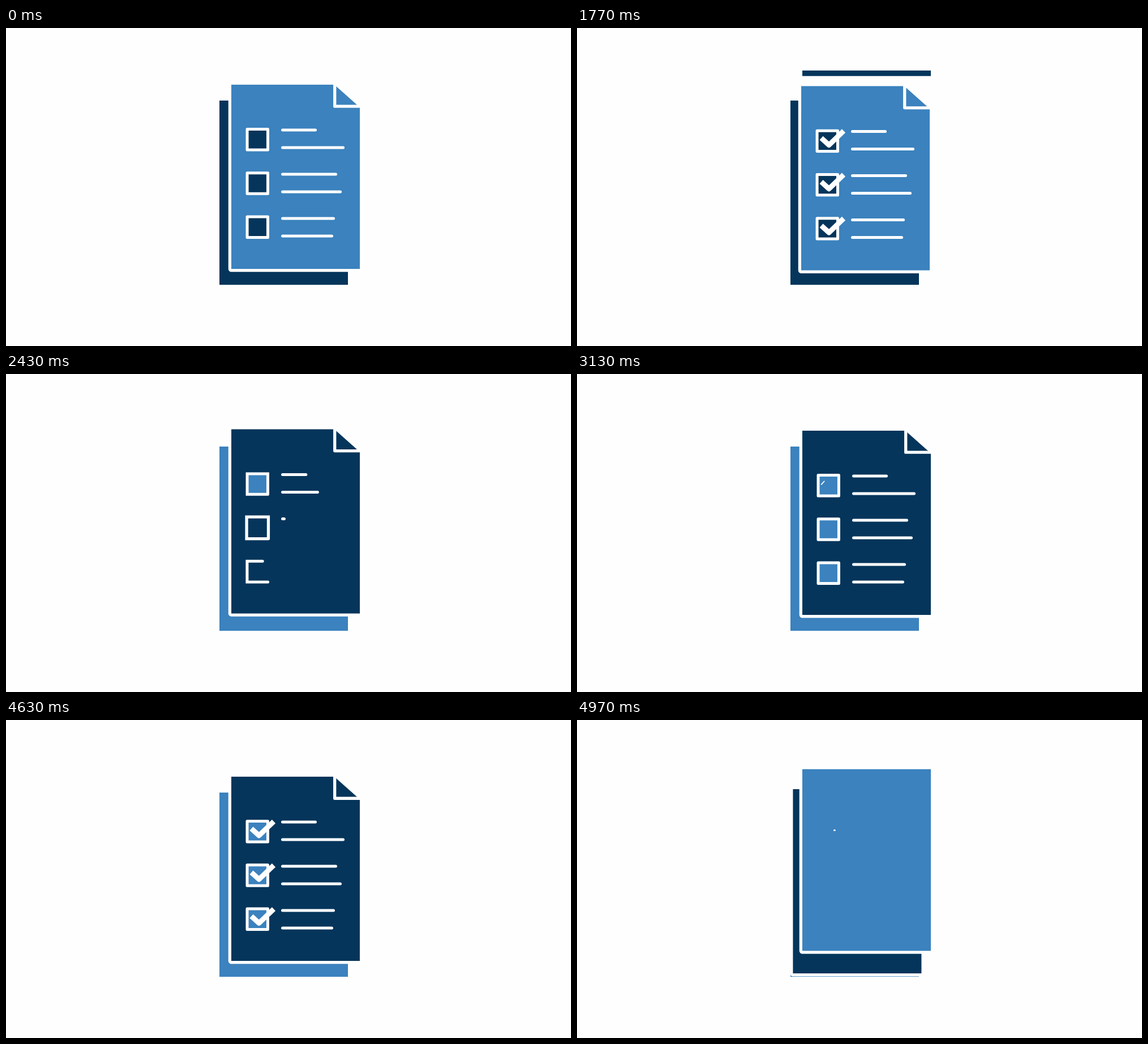
Recreate the animation shown at these times as an HTML page with a canvas. Size 998 by 561 pixels, loop 5.01 s.

```html
<!DOCTYPE html>
<html lang="en">
<head>
<meta charset="utf-8">
<title>Checklist</title>
<style>
  html, body { margin: 0; width: 100%; height: 100%; overflow: hidden; background: #fefefe; }
  canvas { display: block; }
</style>
</head>
<body>
<canvas id="stage" width="998" height="561"></canvas>
<script>
const ctx = document.getElementById('stage').getContext('2d');
const LOOP = 5010, CYCLE = 3000;
const LIGHT = '#3b82be', DARK = '#05355b', WHITE = '#fff';
const LEFT = 398, RIGHT = 625, TOP = 100, HEIGHT = 325;
const BOX = { x: 444.25, y: 196.75, half: 18.2, gap: 77.25 };
const LINES = { x: 488.5, y: 180, gap: 78, inner: 31, ends: [[546.5, 595.5], [582.5, 590.5], [578.5, 575.5]] };
const TICK = [[433.5, 191.5], [447, 203.8], [473, 179]];

const mix = (a, b, k) => a + (b - a) * k;
const smooth = x => x * x * (3 - 2 * x);
const span = (t, start, length) => Math.min(1, Math.max(0, (t - start) / length));

// Cubic bezier (.67, 0, .33, 1), solved for its parameter by bisection.
function ease(x) {
  let lo = 0, hi = 1;
  for (let i = 0; i < 20; i++) {
    const s = (lo + hi) / 2, r = 1 - s;
    if (2.01 * s * r * r + 0.99 * s * s * r + s * s * s < x) lo = s; else hi = s;
  }
  return smooth((lo + hi) / 2);
}
const eased = (t, start, length) => ease(span(t, start, length));

function trace(points) {
  ctx.beginPath();
  points.forEach(([x, y]) => ctx.lineTo(x, y));
}

// Strokes the first part of a polyline.
function strokePart(points, part) {
  const steps = points.slice(1).map(([x, y], i) => Math.hypot(x - points[i][0], y - points[i][1]));
  let left = part * steps.reduce((a, b) => a + b);
  const shown = [points[0]];
  for (let i = 0; i < steps.length && left > 0; i++) {
    const k = Math.min(1, left / steps[i]);
    const [a, b] = [points[i], points[i + 1]];
    shown.push([mix(a[0], b[0], k), mix(a[1], b[1], k)]);
    left -= steps[i];
  }
  trace(shown);
  ctx.stroke();
}

function pen(width, cap, join) {
  ctx.strokeStyle = WHITE;
  ctx.lineWidth = width;
  ctx.lineCap = cap;
  ctx.lineJoin = join;
}

function drawBox(row, age, fill) {
  const drawn = eased(age, 0, 367);
  if (drawn <= 0.001) return;
  const scale = mix(0.6, 1.06, eased(age, 0, 300)) - 0.06 * eased(age, 300, 200);
  const h = BOX.half, filled = eased(age, 365, 120);
  ctx.save();
  ctx.translate(BOX.x, BOX.y + row * BOX.gap);
  ctx.scale(scale, scale);
  ctx.fillStyle = fill;
  ctx.fillRect(-h * filled, -h * filled, 2 * h * filled, 2 * h * filled);
  pen(5, 'round', age > 560 ? 'round' : 'miter');
  strokePart([[h, h], [-h, h], [-h, -h], [h, -h], [h, h]], drawn);
  ctx.restore();
}

function drawLines(row, age) {
  pen(5, 'round', 'round');
  LINES.ends[row].forEach((end, i) => {
    const part = eased(age, i * 19, 365);
    const y = LINES.y + row * LINES.gap + i * LINES.inner;
    if (part > 0.02) strokePart([[LINES.x, y], [end, y]], part);
  });
}

function drawTick(row, t) {
  const part = eased(t, 20 + row * 320, 600);
  if (part < 0.004) return;
  pen(9, 'butt', 'round');
  strokePart(TICK.map(([x, y]) => [x, y + row * BOX.gap]), part);
}

// intro: time on the building clock; ticks: time on the ticking clock.
function drawPage(dx, dy, color, accent, intro, ticks) {
  const height = HEIGHT * eased(intro, 1720, 287);
  if (height < 0.3) return;
  const grown = eased(intro, 2000, 367), fold = grown > 0.015 ? grown : 0;
  ctx.save();
  ctx.translate(dx, dy);
  trace([[LEFT, TOP], [RIGHT - 45 * fold, TOP], [RIGHT, TOP + 40 * fold],
    [RIGHT, TOP + height], [LEFT, TOP + height]]);
  ctx.closePath();
  pen(10.5, 'round', 'round');
  ctx.stroke();
  ctx.fillStyle = color;
  ctx.fill();
  if (fold) {
    const x = RIGHT - 44.3 * fold, y = TOP + 38.2 * fold;
    pen(5.3, 'butt', 'round');
    trace([[x, TOP - 3], [x, y], [RIGHT + 3, y]]);
    ctx.stroke();
  }
  for (let row = 0; row < 3; row++) {
    drawBox(row, intro - 1933 - row * 145, accent);
    drawLines(row, intro - 2220 - row * 145);
    drawTick(row, ticks);
  }
  ctx.restore();
}

// The incoming page drops, overshoots and settles.
function dropOffset(u) {
  return -25 + 28.5 * smooth(span(u, 1853, 267))
    - 6.2 * smooth(span(u, 2120, 280))
    + 2.7 * smooth(span(u, 2400, 267));
}

function draw(time) {
  const t = time % LOOP, u = t % CYCLE;
  const [front, back] = t < CYCLE ? [LIGHT, DARK] : [DARK, LIGHT];
  const slide = eased(u, 1600, 600);
  ctx.fillStyle = '#fefefe';
  ctx.fillRect(0, 0, 998, 561);
  if (slide < 1) {
    ctx.fillStyle = back;
    ctx.fillRect(LEFT - 21, TOP + 28, RIGHT - LEFT, HEIGHT);
  }
  drawPage(-21 * slide, 28 * slide, front, back, CYCLE, u);
  if (u > 1600) drawPage(0, dropOffset(u), back, front, u, 0);
}

const begin = performance.now();
function tick() {
  draw(performance.now() - begin);
  requestAnimationFrame(tick);
}
tick();
</script>
</body>
</html>
```
